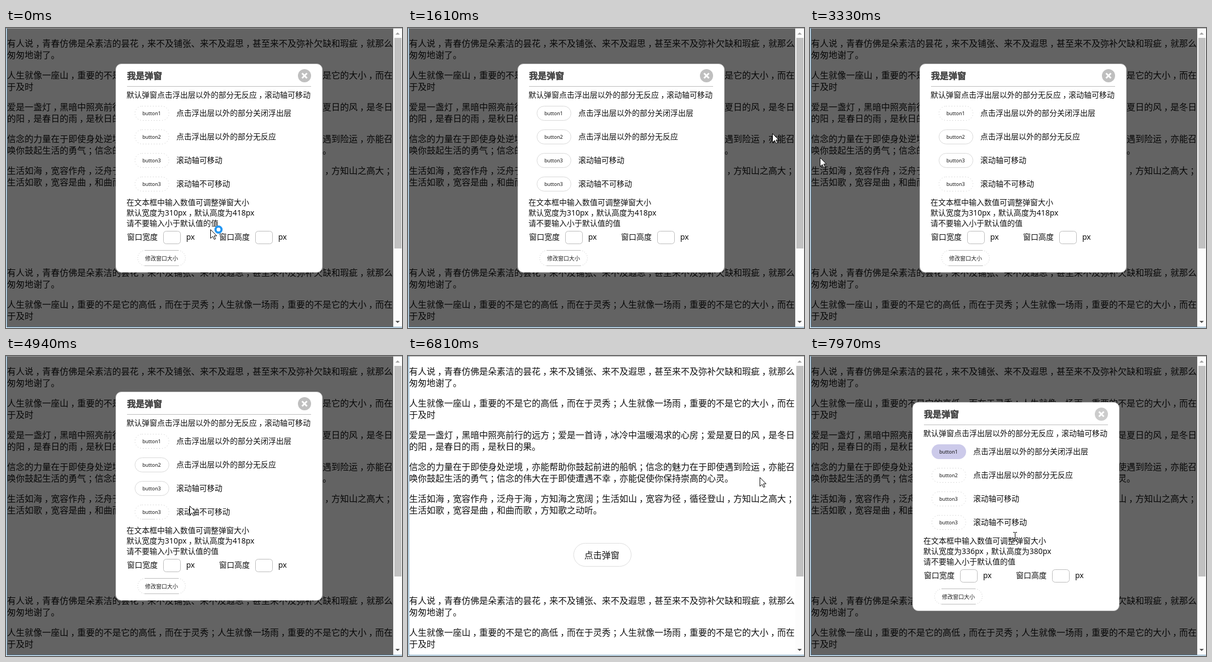
Animation of 723x547 px, one loop 8 s. Source, as an HTML page with a canvas:

```html
<!DOCTYPE html>
<html lang="zh-CN">
<head>
<meta charset="utf-8">
<title>弹窗</title>
<style>
html, body { margin: 0; width: 100%; height: 100%; overflow: hidden; background: #fff; }
canvas { display: block; width: 723px; height: 547px; }
</style>
</head>
<body>
<canvas id="stage" width="723" height="547"></canvas>
<script>
const ctx = document.getElementById('stage').getContext('2d');
const LOOP = 8000;
const FONT = '"Noto Sans", "Noto Sans CJK SC", "Noto Sans CJK", sans-serif';
const LILAC = '#cccaea';
const EDGE = '#5a8fb4';

const paragraphs = [
  ['有人说，青春仿佛是朵素洁的昙花，来不及铺张、来不及遐思，甚至来不及弥补欠缺和瑕疵，就那么', '匆匆地谢了。'],
  ['人生就像一座山，重要的不是它的高低，而在于灵秀；人生就像一场雨，重要的不是它的大小，而在', '于及时'],
  ['爱是一盏灯，黑暗中照亮前行的远方；爱是一首诗，冰冷中温暖渴求的心房；爱是夏日的风，是冬日', '的阳，是春日的雨，是秋日的果。'],
  ['信念的力量在于即使身处逆境，亦能帮助你鼓起前进的船帆；信念的魅力在于即使遇到险运，亦能召', '唤你鼓起生活的勇气；信念的伟大在于即使遭遇不幸，亦能促使你保持崇高的心灵。'],
  ['生活如海，宽容作舟，泛舟于海，方知海之宽阔；生活如山，宽容为径，循径登山，方知山之高大；', '生活如歌，宽容是曲，和曲而歌，方知歌之动听。']
];
const options = [
  ['button1', '点击浮出层以外的部分关闭浮出层'],
  ['button2', '点击浮出层以外的部分无反应'],
  ['button3', '滚动轴可移动'],
  ['button3', '滚动轴不可移动']
];

// Each track lists [start time, value...]; a value holds until the next entry.
const pointer = [
  [0, 'busy', 373, 367], [130, 'arrow', 325, 383], [270, 'arrow', 345, 270],
  [400, 'arrow', 362, 176], [540, 'arrow', 312, 129], [690, 'arrow', 323, 180],
  [820, 'hand', 276, 157], [950, 'hand', 260, 152], [1100, 'hand', 262, 194],
  [1220, 'hand', 264, 236], [1350, 'hand', 268, 274], [1470, 'arrow', 652, 270],
  [1610, 'arrow', 665, 192], [2160, 'arrow', 664, 194], [3070, 'arrow', 630, 182],
  [3190, 'arrow', 565, 174], [3330, 'arrow', 18, 236], [3470, 'arrow', 4, 230],
  [3590, 'arrow', 60, 222], [3710, 'arrow', 124, 222], [4330, 'arrow', 150, 245],
  [4450, 'arrow', 205, 276], [4570, 'hand', 268, 276], [4690, 'beam', 308, 356],
  [4940, 'arrow', 335, 273], [5060, 'beam', 314, 167], [5220, 'hand', 282, 159],
  [5340, 'hand', 267, 157], [5870, 'hand', 273, 158], [6020, 'arrow', 390, 165],
  [6140, 'arrow', 530, 190], [6260, 'arrow', 625, 215], [6380, 'arrow', 642, 221],
  [7240, 'arrow', 580, 270], [7360, 'arrow', 490, 330], [7520, 'hand', 344, 362],
  [7820, 'arrow', 343, 379], [7970, 'beam', 374, 328]
];
// One letter per button: d dotted, s solid, h hovered, p partly dotted.
const borders = [
  [0, 'dddd'], [820, 'hddd'], [1100, 'shdd'], [1220, 'sshd'], [1350, 'sssh'],
  [1470, 'ssss'], [1740, 'dddd'], [2310, 'dssd'], [4570, 'dssh'], [4690, 'dssp'],
  [5220, 'hssp'], [7820, 'hddd']
];
const scrolls = [[0, 0], [1740, 53], [1880, 120], [2160, 166], [2310, 0]];

const at = (track, t) => track.findLast(entry => entry[0] <= t).slice(1);

// Commas and semicolons sit in the middle of their cell.
function label(str, x, midY, size, color = '#111', weight = 400) {
  const y = Math.round(midY + size * 0.38);
  ctx.font = `${weight} ${size}px ${FONT}`;
  ctx.fillStyle = ctx.strokeStyle = color;
  ctx.lineWidth = 0.5;
  for (const part of str.split(/([，；])/)) {
    const shift = /[，；]/.test(part) ? size * 0.25 : 0;
    ctx.fillText(part, x + shift, y);
    if (weight > 400) ctx.strokeText(part, x + shift, y);
    x += ctx.measureText(part).width;
  }
}

function rect(x, y, w, h, color) {
  ctx.fillStyle = color;
  ctx.fillRect(x, y, w, h);
}

function roundBox(x, y, w, h, r, fill, stroke, dash = []) {
  const inset = stroke ? 0.5 : 0;
  ctx.beginPath();
  ctx.roundRect(x + inset, y + inset, w - 2 * inset, h - 2 * inset, r);
  if (fill) { ctx.fillStyle = fill; ctx.fill(); }
  if (stroke) {
    ctx.lineWidth = 1;
    ctx.strokeStyle = stroke;
    ctx.setLineDash(dash);
    ctx.stroke();
    ctx.setLineDash([]);
  }
}

function polygon(points, fill, stroke) {
  ctx.beginPath();
  points.forEach(([x, y]) => ctx.lineTo(x, y));
  ctx.closePath();
  ctx.fillStyle = fill;
  ctx.fill();
  if (stroke) { ctx.lineWidth = 1; ctx.strokeStyle = stroke; ctx.stroke(); }
}

function drawPage(scroll, hovered) {
  ctx.save();
  ctx.beginPath();
  ctx.rect(2, 1, 705, 544);
  ctx.clip();
  ctx.translate(0, -scroll);
  for (const top of [28, 446]) {
    paragraphs.forEach((lines, i) =>
      lines.forEach((line, j) => label(line, 2, top + i * 58 + j * 21, 16)));
  }
  if (hovered) roundBox(302, 341, 106, 43, 21.5, LILAC);
  else roundBox(302, 341, 106, 43, 21, null, '#ddd');
  label('点击弹窗', 322, 363, 16);
  ctx.restore();
}

function chevron(y, dir, color) {
  polygon([[711, y + 2 * dir], [715, y - 2 * dir], [719, y + 2 * dir]], color);
}

function drawFrame(scroll) {
  rect(707, 1, 16, 544, '#fcfcfc');
  rect(709, 18 + scroll * 0.7, 13, 384, '#c1c1c1');
  chevron(10, 1, scroll ? '#505050' : '#a3a3a3');
  chevron(536, -1, '#505050');
  rect(0, 0, 723, 1, '#a0a0a0');
  rect(1, 0, 1, 546, EDGE);
  rect(1, 545, 722, 1, EDGE);
}

function drawOption(i, state) {
  const y = 142 + i * 43;
  const [name, text] = options[i];
  if (state === 'h') roundBox(235, y, 63, 27, 13.5, LILAC);
  else if (state === 's') roundBox(235, y, 63, 27, 13, null, '#d8d8d8');
  else roundBox(235, y, 63, 27, 13, null, '#bbb', [1, 4]);
  if (state === 'p') rect(248, y + 26, 24, 1, '#d8d8d8');
  label(name, 249, y + 13.5, 9);
  label(text, 311, y + 13, 14);
}

function drawDialog(states, width, height, gray) {
  roundBox(200, 65, 378, 381, 10, '#fff', '#c4c4c4');
  label('我是弹窗', 221, 87, 16, '#444', 700);

  ctx.beginPath();
  ctx.arc(545, 87, 12, 0, Math.PI * 2);
  ctx.fillStyle = gray;
  ctx.fill();
  ctx.beginPath();
  ctx.moveTo(540.5, 82.5); ctx.lineTo(549.5, 91.5);
  ctx.moveTo(549.5, 82.5); ctx.lineTo(540.5, 91.5);
  ctx.lineWidth = 3;
  ctx.strokeStyle = '#fff';
  ctx.stroke();

  rect(221, 106, 336, 1, '#bbb');
  label('默认弹窗点击浮出层以外的部分无反应，滚动轴可移动', 220, 122, 14);
  [...states].forEach((state, i) => drawOption(i, state));
  label('在文本框中输入数值可调整弹窗大小', 220, 318, 14);
  label(`默认宽度为${width}px，默认高度为${height}px`, 220, 337, 14);
  label('请不要输入小于默认值的值', 220, 356, 14);

  ['窗口宽度', '窗口高度'].forEach((text, i) => {
    const x = 221 + i * 168;
    label(text, x, 381, 14);
    roundBox(x + 66, 370, 32, 24, 5, '#fff', '#bbb');
    label('px', x + 108, 381, 14);
  });

  roundBox(240, 405, 88, 29, 14, null, '#bbb', [1, 3]);
  rect(253, 405, 62, 1, '#bbb');
  rect(253, 433, 62, 1, '#bbb');
  label('修改窗口大小', 254, 420, 10, '#222');
}

function drawArrow() {
  polygon([[0.5, 0.5], [0.5, 16.5], [4.5, 13], [7.2, 18.5], [9.6, 17.5], [7, 12], [11.8, 12]], '#fff', '#000');
}

function drawHand() {
  ctx.beginPath();
  ctx.moveTo(-1.5, 12);
  ctx.lineTo(-1.5, 1.5);
  ctx.quadraticCurveTo(0, -1, 1.5, 1.5);
  ctx.lineTo(1.5, 7);
  for (const x of [4.5, 7.5, 10.5]) {
    ctx.quadraticCurveTo(x - 1.5, 5 + x / 4, x, 7 + x / 5);
  }
  ctx.lineTo(10.5, 15);
  ctx.quadraticCurveTo(10, 18, 8.5, 19);
  ctx.lineTo(8.5, 22);
  ctx.lineTo(0, 22);
  ctx.lineTo(0, 19.5);
  ctx.lineTo(-5, 12.5);
  ctx.quadraticCurveTo(-5, 9.5, -1.5, 12);
  ctx.closePath();
  ctx.fillStyle = '#fff';
  ctx.fill();
  ctx.lineWidth = 1;
  ctx.strokeStyle = '#000';
  ctx.stroke();
  for (const x of [1, 4, 7]) rect(x, 8, 1, 4, '#000');
}

function drawBeam() {
  rect(0, -6, 1, 14, '#000');
  for (const y of [-7, 8]) {
    rect(-3, y, 3, 1, '#000');
    rect(1, y, 3, 1, '#000');
  }
}

function drawPointer(kind, x, y) {
  ctx.save();
  ctx.translate(x, y);
  if (kind === 'hand') drawHand();
  else if (kind === 'beam') drawBeam();
  else drawArrow();
  if (kind === 'busy') {
    ctx.beginPath();
    ctx.arc(15, 0.5, 5.5, 0, Math.PI * 2);
    ctx.lineWidth = 4;
    ctx.strokeStyle = '#2196f3';
    ctx.stroke();
  }
  ctx.restore();
}

function draw(t) {
  const [scroll] = at(scrolls, t);
  const [states] = at(borders, t);
  const reopened = t >= 7820;
  const open = t < 6810 || reopened;

  rect(0, 0, 723, 547, '#fff');
  drawPage(scroll, t >= 7520);
  if (open) rect(2, 1, 705, 544, 'rgba(0, 0, 0, 0.61)');
  drawFrame(scroll);
  if (open) {
    ctx.save();
    if (reopened) ctx.translate(-13, 19);
    drawDialog(states, reopened ? 336 : 310, reopened ? 380 : 418, reopened ? '#ccc' : '#bfbfbf');
    ctx.restore();
  }
  drawPointer(...at(pointer, t));
}

const start = performance.now();
function tick() {
  draw((performance.now() - start) % LOOP);
  requestAnimationFrame(tick);
}
tick();
</script>
</body>
</html>
```
